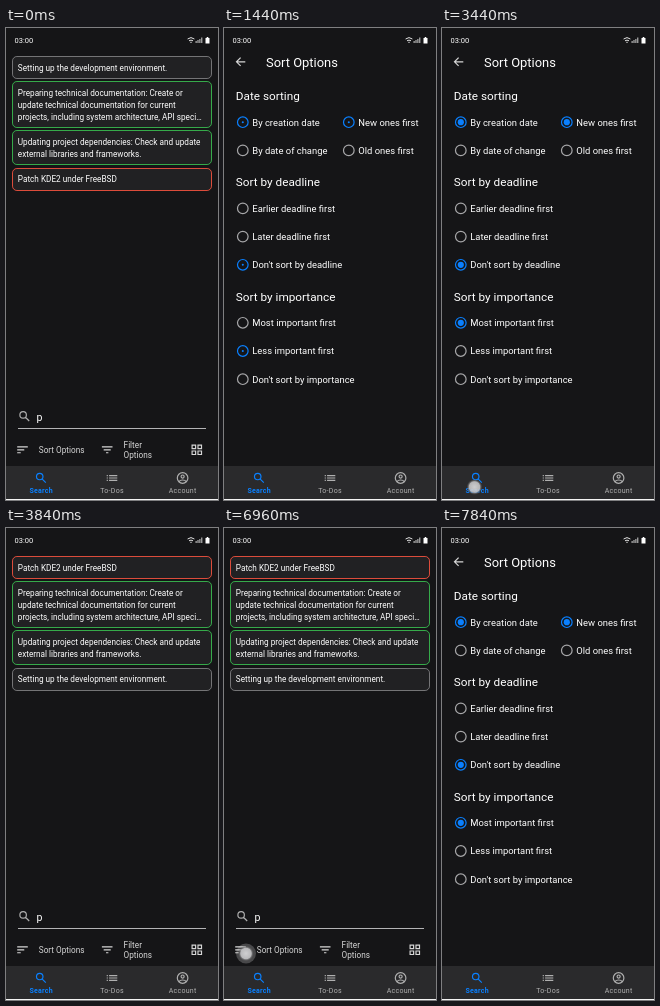
Animation, 212 px wide and 472 px high, one loop 8 s. Source, as an HTML page:

```html
<!DOCTYPE html>
<html lang="en">
<head>
<meta charset="utf-8">
<title>Sort options</title>
<style>
  html, body { margin: 0; width: 100%; height: 100%; overflow: hidden; background: #151517; }
  svg { display: block; width: 100vw; height: 100vh; }
  text { font-family: Roboto, "Noto Sans", sans-serif; white-space: pre; }
</style>
</head>
<body>
<svg id="stage" viewBox="0 0 212 472"></svg>
<script>
const LOOP = 8000, STEP = 80;
const BLUE = '#0a80ff', TEXT = '#fff', ICON = '#d6d6d6', MUTED = '#b0b0b0';
const DP = 212 / 360;

const stage = document.getElementById('stage');

function el(parent, tag, attrs = {}, content) {
  const node = document.createElementNS('http://www.w3.org/2000/svg', tag);
  set(node, attrs);
  if (content !== undefined) node.textContent = content;
  parent.appendChild(node);
  return node;
}
function set(node, attrs) {
  for (const key in attrs) node.setAttribute(key, attrs[key]);
}
function show(node, visible) {
  node.setAttribute('visibility', visible ? 'visible' : 'hidden');
}
function label(parent, x, y, content, sp, fill = TEXT, more = {}) {
  return el(parent, 'text', { x, y, fill, 'font-size': sp * DP, ...more }, content);
}
// Icons live on a 24 unit grid, centred on x, y.
function icon(parent, x, y, d, color = ICON) {
  return el(parent, 'path', {
    d, fill: 'none', stroke: color, 'stroke-width': 2,
    transform: `translate(${x} ${y}) scale(${DP}) translate(-12 -12)`
  });
}

const ICONS = {
  search: 'M15 9.5A5.5 5.5 0 1 1 4 9.5A5.5 5.5 0 1 1 15 9.5M13.4 13.4L19.8 19.8',
  sort: 'M3 7H21M3 12H15M3 17H9',
  filter: 'M3 7H21M6 12H18M10 17H14',
  grid: 'M4 4H10V10H4ZM14 4H20V10H14ZM4 14H10V20H4ZM14 14H20V20H14Z',
  list: 'M3 8H5M7 8H21M3 12H5M7 12H21M3 16H5M7 16H21',
  account: 'M21 12A9 9 0 1 1 3 12A9 9 0 1 1 21 12M14.6 9.5A2.6 2.6 0 1 1 9.4 9.5A2.6 2.6 0 1 1 14.6 9.5M6 18C8 14.6 16 14.6 18 18',
  back: 'M20 12H5M12 5L5 12L12 19'
};

const defs = el(stage, 'defs');
const glow = el(defs, 'radialGradient', { id: 'glow' });
[[0, '#d6d6d8', .95], [.66, '#c8c8ca', .88], [.8, '#808082', .6], [1, '#444', 0]].forEach(
  ([offset, color, opacity]) =>
    el(glow, 'stop', { offset, 'stop-color': color, 'stop-opacity': opacity }));
el(el(defs, 'clipPath', { id: 'button' }), 'rect',
  { x: -12, y: 405, width: 96.5, height: 33, rx: 5, ry: 13 });
el(el(defs, 'clipPath', { id: 'tab' }), 'rect', { x: 0, y: 438, width: 71, height: 33 });

el(stage, 'rect', { width: 212, height: 472, fill: '#151517' });

// Status bar
label(stage, 8.6, 15, '03:00', 12.8);
el(stage, 'path', {
  d: 'M181.6 11Q185 8.2 188.4 11M183 12.8Q185 11.4 187 12.8',
  fill: 'none', stroke: '#e4e4e4', 'stroke-width': 1
});
el(stage, 'path', {
  d: 'M184.4 13.7h1.2v1.3h-1.2zM189.6 13h1v2h-1zM191.5 12h1v3h-1zM193.4 11h1v4h-1zM195.3 9.6h1v5.4h-1z',
  fill: '#d0d0d0'
});
el(stage, 'path', { d: 'M199.5 10h1.2v-.9h1.6v.9h1.2v5.4h-4z', fill: '#fff' });

// Search page
const LINE = 20 * DP;
const SETUP = ['#858587', 'Setting up the development environment.'];
const DOCS = ['#3cc453', 'Preparing technical documentation: Create or',
  'update technical documentation for current',
  'projects, including system architecture, API speci…'];
const UPDATES = ['#3cc453', 'Updating project dependencies: Check and update',
  'external libraries and frameworks.'];
const PATCH = ['#ff5542', 'Patch KDE2 under FreeBSD'];

const searchPage = el(stage, 'g');

function cardList(tasks) {
  const group = el(searchPage, 'g');
  let y = 28.3;
  for (const [color, ...lines] of tasks) {
    const height = 10.6 + lines.length * LINE;
    // Borders sit on whole pixels.
    const top = Math.floor(y) + .5, bottom = Math.floor(y + height) + .5;
    el(group, 'rect', {
      x: 6.5, y: top, width: 199, height: bottom - top, rx: 4.4,
      fill: '#212123', stroke: color, 'stroke-width': .85
    });
    lines.forEach((line, i) => label(group, 11.8, y + 14.2 + i * LINE, line, 13.95));
    y += height + 3.1;
  }
  return group;
}
const unsorted = cardList([SETUP, DOCS, UPDATES, PATCH]);
const sorted = cardList([PATCH, DOCS, UPDATES, SETUP]);

const buttonRipple = el(el(searchPage, 'g', { 'clip-path': 'url(#button)' }), 'circle',
  { fill: '#fff', 'fill-opacity': .22 });

icon(searchPage, 18.6, 388.4, ICONS.search, MUTED);
label(searchPage, 30.4, 393, 'p', 18);
el(searchPage, 'rect', { x: 12, y: 400, width: 188, height: 1, fill: '#b4b4b6' });
icon(searchPage, 16.5, 421.8, ICONS.sort);
label(searchPage, 32.8, 424.8, 'Sort Options', 13.95, ICON);
icon(searchPage, 101.2, 421.8, ICONS.filter);
label(searchPage, 117.6, 420, 'Filter', 13.95, ICON);
label(searchPage, 117.6, 430, 'Options', 13.95, ICON);
icon(searchPage, 190.8, 421.8, ICONS.grid);

// Sort page
const sortPage = el(stage, 'g');
icon(sortPage, 16.6, 33.8, ICONS.back);
label(sortPage, 42, 38.6, 'Sort Options', 22);
label(sortPage, 11.8, 72.2, 'Date sorting', 20);
label(sortPage, 11.8, 158.4, 'Sort by deadline', 20);
label(sortPage, 11.8, 272.6, 'Sort by importance', 20);

const radioRipple = el(sortPage, 'circle', { cx: 18.8, cy: 294.8, fill: '#fff' });

function radio(x, y, content) {
  const ring = el(sortPage, 'circle', { cx: x, cy: y, r: 5.3, fill: 'none', 'stroke-width': 1.2 });
  const dot = el(sortPage, 'circle', { cx: x, cy: y, fill: BLUE });
  label(sortPage, x + 9.5, y + 3.4, content, 16);
  return (checked, size) => {
    set(ring, { stroke: checked ? BLUE : '#a8a8aa' });
    set(dot, { r: checked ? 3.1 * size : 0 });
  };
}
const radios = {
  created: radio(18.8, 94.2, 'By creation date'),
  newest: radio(124.8, 94.2, 'New ones first'),
  changed: radio(18.8, 122.4, 'By date of change'),
  oldest: radio(124.8, 122.4, 'Old ones first'),
  earlier: radio(18.8, 180.4, 'Earlier deadline first'),
  later: radio(18.8, 208.6, 'Later deadline first'),
  noDeadline: radio(18.8, 236.8, "Don't sort by deadline"),
  most: radio(18.8, 294.8, 'Most important first'),
  less: radio(18.8, 323, 'Less important first'),
  noImportance: radio(18.8, 351.2, "Don't sort by importance")
};

// Tab bar
el(stage, 'rect', { y: 438, width: 212, height: 33, fill: '#2a2a2c' });
el(stage, 'rect', { y: 471, width: 212, height: 1, fill: '#f4f4f4' });
const tabRipple = el(el(stage, 'g', { 'clip-path': 'url(#tab)' }), 'circle',
  { cx: 32.5, cy: 459, fill: '#fff' });
[['Search', 'search', 35.2, BLUE, 700], ['To-Dos', 'list', 106, MUTED, 400],
  ['Account', 'account', 176.6, MUTED, 400]]
  .forEach(([name, glyph, x, color, weight]) => {
    icon(stage, x, 450, ICONS[glyph], color);
    label(stage, x, 465.3, name, 12, color,
      { 'text-anchor': 'middle', 'font-weight': weight, 'letter-spacing': .24 });
  });

const finger = el(stage, 'circle', { r: 8, fill: 'url(#glow)' });

const TOUCHES = [
  { from: 1120, to: 1440, x: 33.5, y: 429 },
  { from: 2080, to: 2480, x: 25, y: 290 },
  { from: 3120, to: 3600, x: 32.5, y: 459 },
  { from: 5920, to: 7360, x: 22, y: 425.5 }
];
const PRESSES = [
  { from: 1120, to: 1360, x: 33.5, y: 429 },
  { from: 6960, to: 7280, x: 22, y: 425.5 }
];
const SORT_VISITS = [[1360, 3520], [7280, LOOP]];
const SELECT_AT = 2480;

const clamp = v => Math.max(0, Math.min(1, v));
const progress = (t, from, length) => clamp((t - from) / length);
const active = (spans, t) => spans.find(s => t >= s.from && t < s.to);

function fadeRipple(node, t, from, length, radius, opacity) {
  const p = progress(t, from, length);
  set(node, { r: radius * clamp(p * 2.5), 'fill-opacity': t < from ? 0 : opacity * (1 - p) });
}

function render(time) {
  const t = Math.floor(time / STEP) * STEP;
  const visit = SORT_VISITS.find(([from, to]) => t >= from && t < to);
  show(searchPage, !visit);
  show(sortPage, visit);
  show(unsorted, !visit && t < 1360);
  show(sorted, !visit && t >= 1360);

  const press = active(PRESSES, t);
  set(buttonRipple, press
    ? { cx: press.x, cy: press.y, r: 10 + 54 * progress(t, press.from, 160) }
    : { r: 0 });

  const grown = visit ? progress(t, visit[0], 240) : 0;
  const selected = t >= SELECT_AT;
  for (const name in radios) {
    const checked = ['created', 'newest', 'noDeadline', selected ? 'most' : 'less'].includes(name);
    const size = name === 'most' ? Math.min(grown, progress(t, SELECT_AT - STEP, 160)) : grown;
    radios[name](checked, size);
  }
  fadeRipple(radioRipple, t, 2320, 560, 11, .2);
  fadeRipple(tabRipple, t, 3440, 400, 36, .08);

  const touch = active(TOUCHES, t);
  show(finger, touch);
  if (touch) {
    const leaving = touch.to - t <= STEP;
    set(finger, { cx: touch.x, cy: touch.y, opacity: leaving ? .65 : 1 });
  }
}

const start = performance.now();
function tick() {
  render((performance.now() - start) % LOOP);
  requestAnimationFrame(tick);
}
tick();
</script>
</body>
</html>
```
